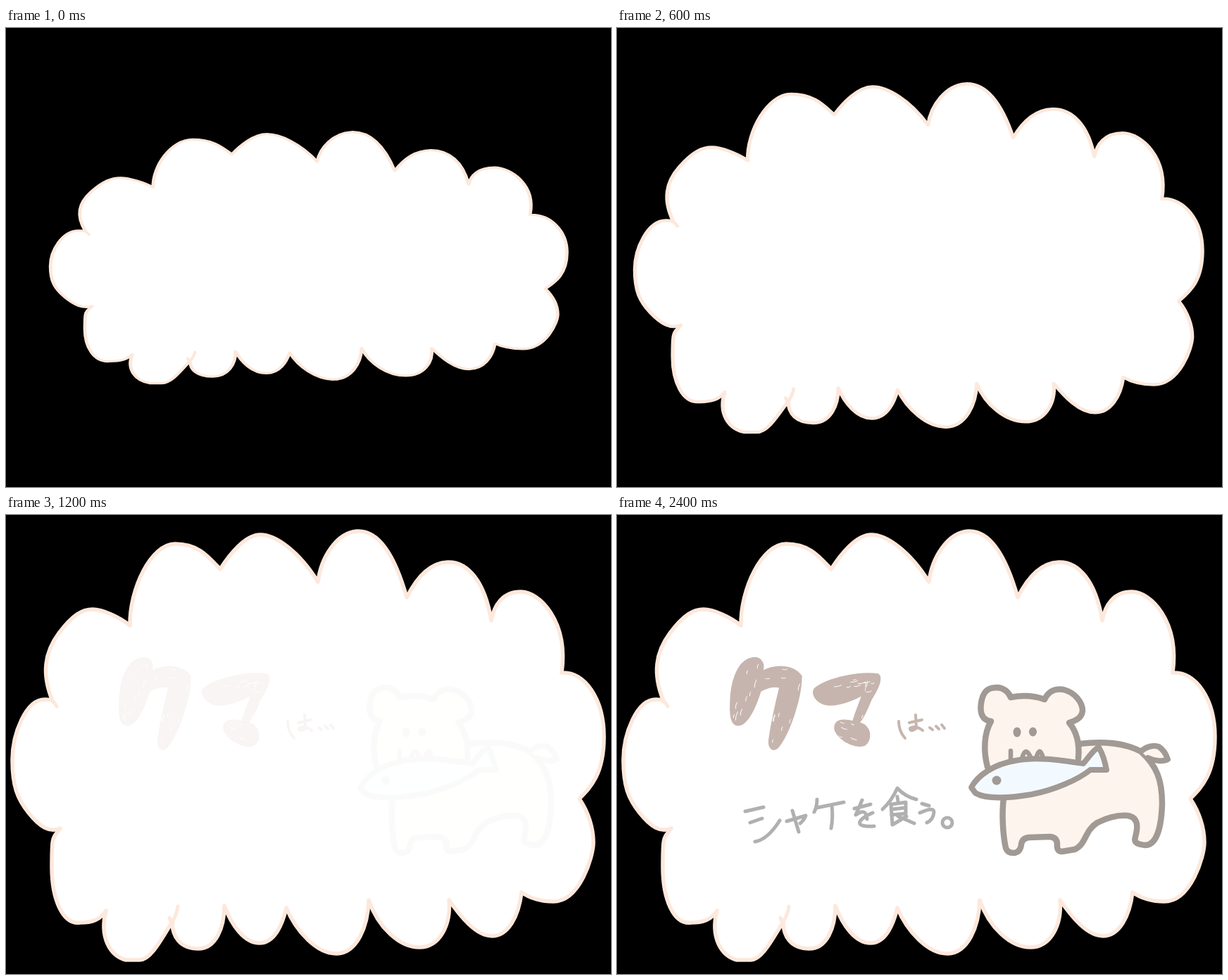
Animation, 859 px wide and 652 px high, one loop 2.6 s. Source, as an HTML page with a canvas:

```html
<!DOCTYPE html>
<html lang="ja">
<head>
<meta charset="utf-8">
<title>クマは… シャケを食う。</title>
<style>
  html, body { margin: 0; width: 100%; height: 100%; overflow: hidden; background: #000; }
  canvas { display: block; }
</style>
</head>
<body>
<canvas id="stage" width="859" height="652"></canvas>
<script>
const ctx = document.getElementById('stage').getContext('2d');
const LOOP = 2600;

// Cloud outline, at full size
const cloudTop = 'M176 157C175 105 206 41 240 41S288 60 304 77' +
  'C318 55 340 28 361 28S415 50 443 95C447 60 470 25 498 23S550 50 569 117' +
  'C580 95 598 68 627 67S680 95 689 150C693 128 705 109 731 109S799 150 789 224' +
  'C822 222 849 262 849 315S830 387 814 403C827 422 834 445 834 465S815 549 777 549' +
  'C760 549 745 545 732 536';
const cloudBottom = 'C728 570 713 598 690 598S645 570 629 547' +
  'C632 582 616 614 587 614S528 585 515 547C514 585 498 622 470 623S412 592 398 558' +
  'C393 580 382 608 360 608S320 582 310 555C310 586 298 616 273 616S236 600 236 578' +
  'C222 600 206 632 190 632L170 632C148 626 132 600 142 562C134 575 122 579 105 579';
const cloudLeft = 'C80 582 65 545 65 500S66 460 77 445C62 452 48 443 32 423' +
  'S9 385 9 348S28 262 55 262C60 262 63 262 66 264C50 225 55 195 75 168' +
  'S109 134 123 134S161 145 176 157Z';
const cloud = new Path2D(cloudTop + cloudBottom + cloudLeft);
const cloudTicks = new Path2D('M232 572L236 582M244 556Q243 566 236 578M64 263Q69 266 72 272');

// Cloud bounds over time: left, top, right, bottom
const FULL = [6.5, 20, 852, 634.5];
const growth = [
  [0, 61, 146, 799, 506],
  [400, 38, 102, 821, 551],
  [600, 23, 77, 834, 576],
  [700, 17, 57, 841, 597],
  [800, 12, 40, 847, 615],
  [900, 8.5, 27, 850, 628],
  [1000, ...FULL]
];

// Stepped fades: [start, opacity]
const titleFade = [[1200, .13], [1400, .32], [1500, .56], [1600, .8], [1700, 1]];
const bearFade = [[1200, .045], [1400, .17], [1500, .33], [1600, .52], [1700, .78], [1900, 1]];
const lineFade = [[1700, .14], [2100, .45], [2200, .78], [2400, 1]];

const bear = {
  body: new Path2D('M549 402C546 425 548 455 552 473Q555 481 565 480Q573 478 574 468' +
    'Q575 459 585 458L615 457Q625 458 625 468Q624 478 632 478L650 475' +
    'C666 468 664 448 682 437C698 429 712 426 725 427C742 430 739 446 736 457' +
    'C733 466 740 468 750 469C766 469 773 444 774 410C774 376 766 356 744 336' +
    'C722 324 690 321 657 325'),
  tail: new Path2D('M744 336C752 328 762 327 769 329C777 334 780 341 782 347C775 351 762 349 754 345'),
  head: new Path2D('M526 358C520 335 521 310 531 293C515 291 515 275 518 262' +
    'C522 246 532 245 541 245Q554 247 559 259Q585 254 607 262C613 249 624 246 634 248' +
    'C650 252 661 266 661 278C660 288 652 292 642 295C653 308 657 325 655 346'),
  mouth: new Path2D('M559 335L559 347M575 346Q580 326 588 346M595 346Q600 326 605 345'),
  fish: new Path2D('M503 387C512 370 535 354 565 349C596 343 628 348 662 353' +
    'C668 347 676 333 684 330C690 340 693 351 695 362L672 362' +
    'C655 376 620 391 588 397C558 402 524 404 509 395Z')
};

const title = new Path2D(
  'M192 203C206 200 211 215 206 222C222 213 250 211 262 229C262 260 245 310 229 330' +
  'C222 337 214 332 216 318C220 290 226 265 231 245C222 242 212 246 204 250' +
  'C197 272 188 293 176 298C164 302 160 290 161 268C161 240 170 207 192 203Z' +
  'M281 246C300 231 345 222 371 226C378 232 370 248 361 262C356 275 350 288 344 295' +
  'C362 300 362 320 352 327C335 333 308 315 309 301C310 290 322 290 335 293' +
  'C338 282 344 268 348 256C330 266 302 275 290 267C280 262 276 252 281 246Z');
const particle = new Path2D('M400 293Q400 307 409 317M415 295L433 291M424 284L425 303' +
  'Q416 309 416 303Q423 298 434 306M444 302L448 305M453 300L457 304M461 298L465 303');

const sentence = [
  'M182 421L208 415M189 437L206 431M196 464Q214 461 231 434',
  'M241 435L268 427Q266 433 260 438M249 420L258 450',
  'M284 404Q284 414 280 422M283 416L322 408M305 412Q307 430 304 445',
  'M337 417L360 411M348 405L339 426Q354 415 355 432M363 423C340 433 336 444 365 442',
  'M377 418Q390 406 398 388Q409 400 425 404M398 400L399 407M389 411L391 440L403 433',
  'M389 411L410 408L410 424L390 426M391 418L408 416M411 428L402 433M399 428L422 438',
  'M433 410L443 413M430 423Q450 414 450 422Q449 433 440 437',
  'M462 437A7 7 0 1 0 476 437A7 7 0 1 0 462 437'
].map(d => new Path2D(d));

// Strokes along the lettering: start, end, number of gaps
const hatch = [
  [190, 212, 170, 288, 9], [210, 227, 250, 226, 5], [248, 230, 224, 322, 9],
  [288, 252, 366, 236, 9], [362, 242, 345, 286, 4], [316, 304, 352, 318, 5]
];

function seeded(seed) {
  return () => (seed = (seed * 16807) % 2147483647) / 2147483647;
}

// Tint of a colour on white
function tint(rgb, a) {
  return `rgb(${rgb.map(c => Math.round(255 + (c - 255) * a))})`;
}

function level(steps, t) {
  return steps.reduce((a, [start, v]) => t >= start ? v : a, 0);
}

function cloudBounds(t) {
  const i = growth.findIndex(k => k[0] > t);
  if (i < 0) return FULL;
  const a = growth[i - 1], b = growth[i];
  const p = (t - a[0]) / (b[0] - a[0]);
  return a.slice(1).map((v, n) => v + (b[n + 1] - v) * p);
}

function line(path, color, width) {
  ctx.strokeStyle = color;
  ctx.lineWidth = width;
  ctx.stroke(path);
}

function shape(path, fill, stroke, width) {
  ctx.fillStyle = fill;
  ctx.fill(path);
  line(path, stroke, width);
}

function dot(x, y, rx, ry, color) {
  ctx.fillStyle = color;
  ctx.beginPath();
  ctx.ellipse(x, y, rx, ry, 0, 0, Math.PI * 2);
  ctx.fill();
}

function drawCloud(t) {
  const [l, top, r, b] = cloudBounds(t);
  ctx.save();
  ctx.translate(l, top);
  ctx.scale((r - l) / (FULL[2] - FULL[0]), (b - top) / (FULL[3] - FULL[1]));
  ctx.translate(-FULL[0], -FULL[1]);
  shape(cloud, '#fff', '#fde8dc', 5.5);
  line(cloudTicks, '#fde8dc', 5);
  ctx.restore();
}

function drawTitle(a) {
  const ink = tint([198, 181, 174], a);
  shape(title, ink, ink, 1.5);
  const rnd = seeded(77);
  ctx.save();
  ctx.clip(title);
  ctx.strokeStyle = '#fff';
  ctx.lineWidth = .9;
  for (const [x1, y1, x2, y2, n] of hatch) {
    const angle = Math.atan2(y2 - y1, x2 - x1);
    for (let i = 0; i < n; i++) {
      const p = rnd(), side = (rnd() - .5) * 28, len = 2 + rnd() * 4;
      ctx.save();
      ctx.translate(x1 + (x2 - x1) * p, y1 + (y2 - y1) * p);
      ctx.rotate(angle);
      ctx.beginPath();
      ctx.moveTo(-len, side);
      ctx.quadraticCurveTo(0, side + 1.5, len, side);
      ctx.stroke();
      ctx.restore();
    }
  }
  ctx.restore();
  line(particle, ink, 4);
}

function drawBear(a) {
  const ink = tint([161, 153, 148], a), skin = tint([254, 244, 238], a);
  shape(bear.body, skin, ink, 8.5);
  shape(bear.tail, skin, ink, 8);
  shape(bear.head, skin, ink, 8.5);
  line(bear.mouth, ink, 6.5);
  shape(bear.fish, tint([243, 250, 255], a), ink, 8);
  dot(568, 308.5, 5.5, 7, ink);
  dot(590.5, 308, 5.5, 6.5, ink);
  dot(539, 377, 6.5, 6.5, ink);
}

function draw(now) {
  const t = Math.floor((now % LOOP) / 100) * 100;
  ctx.fillStyle = '#000';
  ctx.fillRect(0, 0, 859, 652);
  ctx.lineJoin = ctx.lineCap = 'round';
  drawCloud(t);
  const titleA = level(titleFade, t), bearA = level(bearFade, t), lineA = level(lineFade, t);
  if (titleA) drawTitle(titleA);
  if (bearA) drawBear(bearA);
  if (lineA) for (const glyph of sentence) line(glyph, tint([176, 176, 176], lineA), 5);
}

let start;
function tick(now) {
  start ??= now;
  draw(now - start);
  requestAnimationFrame(tick);
}
draw(0);
requestAnimationFrame(tick);
</script>
</body>
</html>
```
